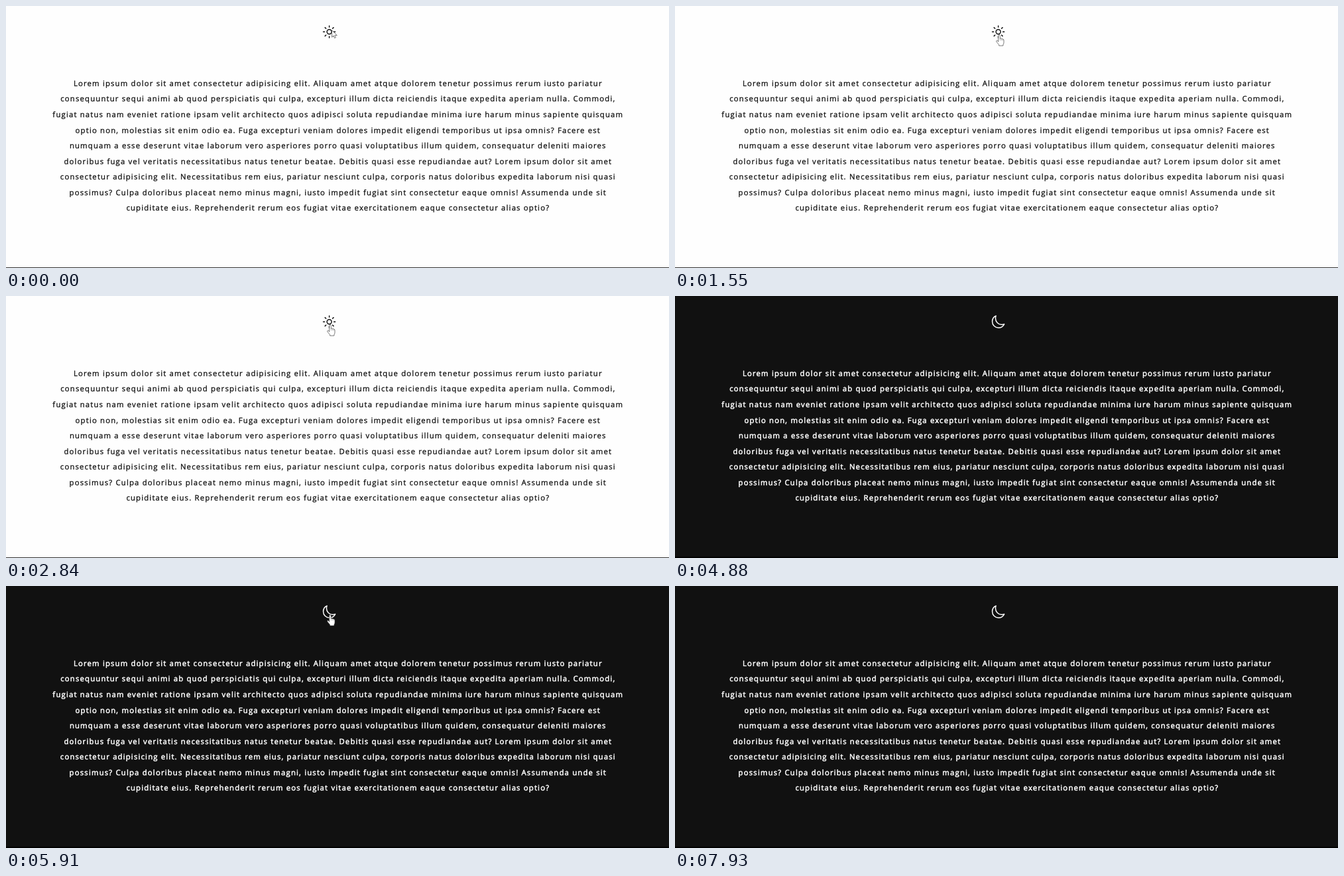
These frames come from a looping animation (1000 px wide and 396 px high, 8.96 s). An HTML page with a canvas:

```html
<!DOCTYPE html>
<html lang="en">
<head>
<meta charset="utf-8">
<title>Theme switch</title>
<style>
  html, body { margin: 0; width: 100%; height: 100%; overflow: hidden; }
  body { background: #fefefe; color: #111; }
  body.dark { background: #111; color: #fff; }
  canvas { position: absolute; left: 0; top: 0; }
  p {
    position: absolute; left: 0.8px; top: 105.9px; width: 1000px; margin: 0;
    font: 400 11.3px/23.55px "Open Sans", "Noto Sans", sans-serif;
    letter-spacing: 1.19px; text-align: center; white-space: nowrap;
    text-rendering: geometricPrecision;
    -webkit-text-stroke: 0.3px currentColor;
  }
  .dark p { -webkit-text-stroke-width: 0.5px; }
</style>
</head>
<body>
<p>Lorem ipsum dolor sit amet consectetur adipisicing elit. Aliquam amet atque dolorem tenetur possimus rerum iusto pariatur<br>
consequuntur sequi animi ab quod perspiciatis qui culpa, excepturi illum dicta reiciendis itaque expedita aperiam nulla. Commodi,<br>
fugiat natus nam eveniet ratione ipsam velit architecto quos adipisci soluta repudiandae minima iure harum minus sapiente quisquam<br>
optio non, molestias sit enim odio ea. Fuga excepturi veniam dolores impedit eligendi temporibus ut ipsa omnis? Facere est<br>
numquam a esse deserunt vitae laborum vero asperiores porro quasi voluptatibus illum quidem, consequatur deleniti maiores<br>
doloribus fuga vel veritatis necessitatibus natus tenetur beatae. Debitis quasi esse repudiandae aut? Lorem ipsum dolor sit amet<br>
consectetur adipisicing elit. Necessitatibus rem eius, pariatur nesciunt culpa, corporis natus doloribus expedita laborum nisi quasi<br>
possimus? Culpa doloribus placeat nemo minus magni, iusto impedit fugiat sint consectetur eaque omnis! Assumenda unde sit<br>
cupiditate eius. Reprehenderit rerum eos fugiat vitae exercitationem eaque consectetur alias optio?</p>
<canvas width="1000" height="396"></canvas>
<script>
const LOOP = 8960;
const DARK_AT = 3850;
const ctx = document.querySelector("canvas").getContext("2d");

const MOON = new Path2D("M160 136c0-30.62 4.51-61.61 16-88C99.57 81.27 48 159.32 48 248" +
  "c0 119.29 96.71 216 216 216 88.68 0 166.73-51.57 200-128-26.39 11.49-57.38 16-88 16" +
  "-119.29 0-216-96.71-216-216z");
const ARROW = new Path2D("M0 0V10.2L2.4 8L4 11.5L5.7 10.7L4.2 7.4H7.3Z");
const HAND = new Path2D("M3.6 9.6V1.8a1.3 1.3 0 0 1 2.6 0V6.2q1.2-.8 2.2.4 1.2-.6 2 .5" +
  "Q12 7 12 8.8V12q0 2-1.1 3.4V17H4.6V15.6L1 11.2q-1-1.7.3-2.1 1-.2 2.3 1.6Z");
const KNUCKLES = new Path2D("M6.2 6.2V9M8.4 6.8V9M10.4 7.3V9.2");

function drawAt(x, y, scale, draw) {
  ctx.save();
  ctx.translate(x, y);
  ctx.scale(scale, scale);
  draw();
  ctx.restore();
}

function drawSun() {
  ctx.beginPath();
  ctx.arc(0, 0, 80, 0, Math.PI * 2);
  for (let i = 0; i < 8; i++) {
    const c = Math.cos(i * Math.PI / 4), s = Math.sin(i * Math.PI / 4);
    ctx.moveTo(c * 160, s * 160);
    ctx.lineTo(c * 208, s * 208);
  }
  ctx.stroke();
}

function drawMoon() {
  ctx.translate(-256, -256);
  ctx.stroke(MOON);
}

function drawIcon(dark) {
  ctx.strokeStyle = dark ? "#fff" : "#111";
  ctx.lineWidth = 34;
  ctx.lineCap = ctx.lineJoin = "round";
  drawAt(487.6, 39, 0.0435, dark ? drawMoon : drawSun);
}

function drawPointer(shape, x, y, detail) {
  drawAt(x, y, 1, () => {
    ctx.fillStyle = "#fff";
    ctx.strokeStyle = "#333";
    ctx.lineWidth = 0.65;
    ctx.fill(shape);
    ctx.stroke(shape);
    if (detail) {
      ctx.lineWidth = 0.35;
      ctx.stroke(detail);
    }
  });
}

function render(t) {
  const dark = t >= DARK_AT;
  document.body.className = dark ? "dark" : "";
  ctx.clearRect(0, 0, 1000, 396);

  ctx.fillStyle = dark ? "#000" : "#333";
  ctx.fillRect(0, dark ? 394 : 395, 1000, 2);

  drawIcon(dark);
  if (t < 100) drawPointer(ARROW, 491.6, 37);
  else if (!dark || (t >= 5910 && t < 7930)) drawPointer(HAND, 484, 43, KNUCKLES);
}

function tick() {
  render(performance.now() % LOOP);
  requestAnimationFrame(tick);
}
tick();
</script>
</body>
</html>
```
